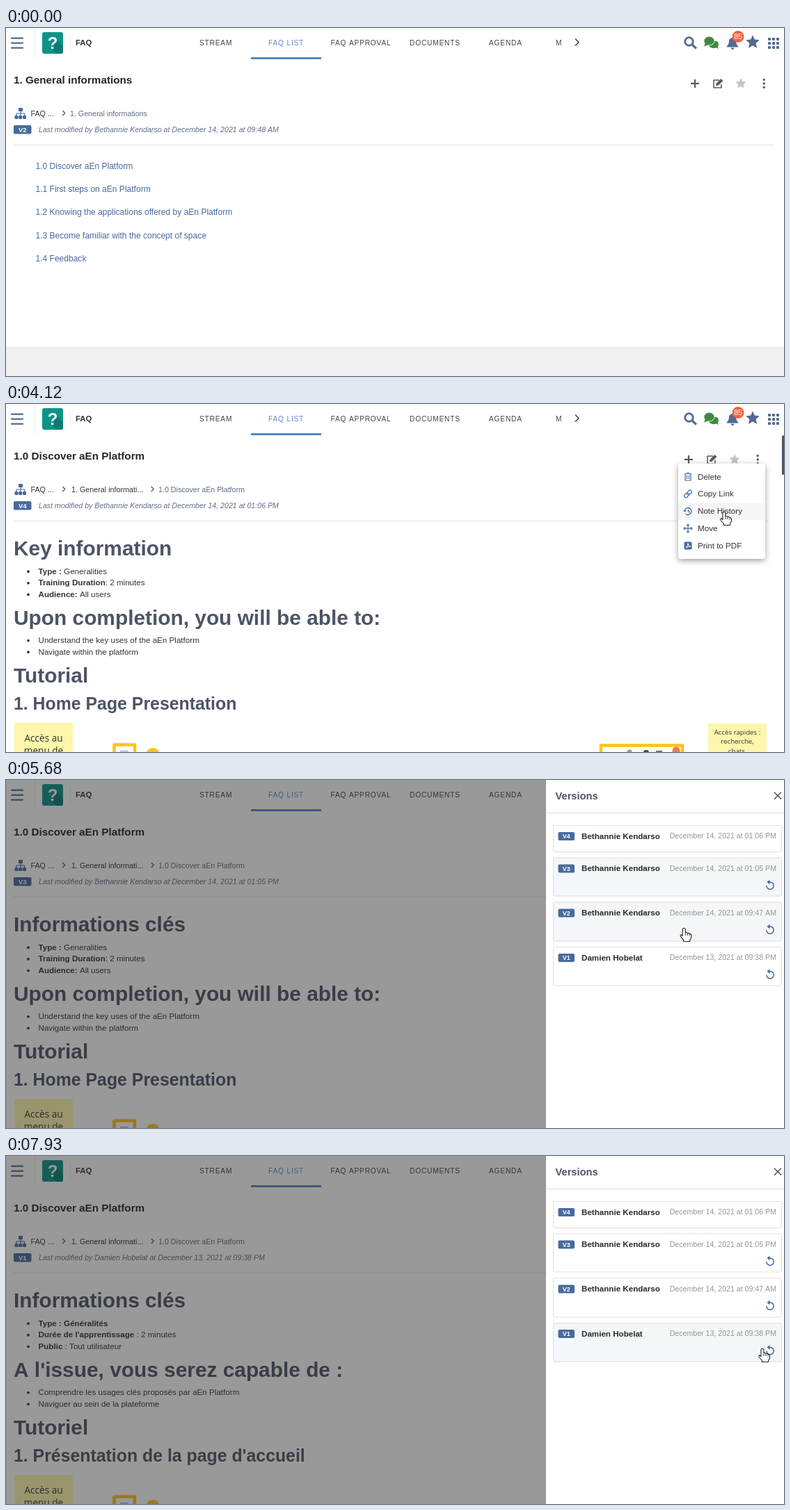
Write an HTML page with a canvas that moves like this. It is 1118 px wide and 501 px high and loops after 7.99 s.

```html
<!DOCTYPE html>
<html lang="en">
<head>
<meta charset="utf-8">
<title>Note versions</title>
<style>
html, body { margin: 0; width: 100%; height: 100%; overflow: hidden; background: #fff; }
canvas { display: block; width: 1118px; height: 501px; }
</style>
</head>
<body>
<canvas id="stage"></canvas>
<script>
const W = 1118, H = 501, LOOP = 7990;
const SANS = '"Liberation Sans", Arial, sans-serif';
const NOTE = '"Open Sans", sans-serif';
const BLUE = '#476a9c', ICON = '#536a94', DARK = '#333', SLATE = '#4d5466', GREY = '#5f6f88', TOOL = '#5a5a5a';
const BRAND = 'aEn Platform', USER = 'Bethannie Kendarso', USER2 = 'Damien Hobelat';

const canvas = document.getElementById('stage');
const dpr = window.devicePixelRatio || 1;
canvas.width = W * dpr;
canvas.height = H * dpr;
const c = canvas.getContext('2d');

const clamp = v => Math.max(0, Math.min(1, v));
const between = (t, a, b) => t >= a && t < b;

// Bursts of change: start, end, number of steps
const bursts = [
  [460, 1190, 12], [1320, 1320, 1], [1520, 1790, 4], [2050, 2540, 8], [2740, 3500, 12],
  [3560, 4320, 12], [4390, 5130, 12], [5200, 5960, 12], [6030, 6780, 11], [6850, 7060, 4], [7260, 7930, 11]
];

function holdTime(t) {
  const b = bursts.filter(b => t >= b[0]).pop();
  if (!b) return 0;
  const [start, end, n] = b;
  if (n === 1) return start;
  const step = (end - start) / (n - 1);
  return start + step * Math.min(n - 1, Math.floor((t - start) / step + 1e-6));
}

// Drawing helpers
function text(s, x, y, size, color, o = {}) {
  c.font = `${o.style || ''} ${o.bold ? 'bold' : ''} ${size}px ${o.font || SANS}`;
  c.letterSpacing = (o.spacing || 0) + 'px';
  c.textAlign = o.align || 'left';
  c.fillStyle = color;
  c.fillText(s, x, y);
  return c.measureText(s).width;
}
const bold = (s, x, y, size, color, o) => text(s, x, y, size, color, { bold: true, ...o });

function rect(x, y, w, h, color, r = 0) {
  c.fillStyle = color;
  c.beginPath();
  c.roundRect(x, y, w, h, r);
  c.fill();
}

function frame(x, y, w, h, color, width = 1, r = 0) {
  c.strokeStyle = color;
  c.lineWidth = width;
  c.beginPath();
  c.roundRect(x, y, w, h, r);
  c.stroke();
}

function dot(x, y, r, color, ry = r) {
  c.fillStyle = color;
  c.beginPath();
  c.ellipse(x, y, r, ry, 0, 0, Math.PI * 2);
  c.fill();
}

function at(x, y, draw) {
  c.save();
  c.translate(x, y);
  draw();
  c.restore();
}

function stroke(d, color, width = 1.5) {
  c.strokeStyle = color;
  c.lineWidth = width;
  c.stroke(new Path2D(d));
}

function fill(d, color) {
  c.fillStyle = color;
  c.fill(new Path2D(d));
}

function star(x, y, r, color) {
  c.fillStyle = color;
  c.beginPath();
  for (let i = 0; i < 10; i++) {
    const a = i * Math.PI / 5 - Math.PI / 2, q = i % 2 ? r * 0.47 : r;
    c.lineTo(x + q * Math.cos(a), y + q * Math.sin(a));
  }
  c.closePath();
  c.fill();
}

const chevron = (x, y, s, color, w) => at(x, y, () => stroke(`M${-s / 2} ${-s}L${s / 2} 0L${-s / 2} ${s}`, color, w));

function badge(label, x, y, w, h) {
  rect(x, y, w, h, BLUE, 2);
  bold(label, x + w / 2, y + h / 2 + 3.3, h > 12 ? 9.6 : 9, '#fff', { align: 'center' });
}

// Page parts
function header() {
  for (const y of [13.5, 20.5, 27.5]) rect(7, y, 18, 2.2, ICON, 1);
  rect(41, 0, 1, 42, '#e8e8e8');
  rect(52, 6, 30, 31, '#0d9488', 3);
  fill('M72 16L82 26V34Q82 37 79 37H73L64 29Z', '#0a7c72');
  bold('?', 67, 30, 24, '#fff', { align: 'center' });
  rect(92, 10, 1, 23, '#e8e8e8');
  bold('FAQ', 100, 25, 11.4, DARK);
  const tabs = [['STREAM', 278], ['FAQ LIST', 377], ['FAQ APPROVAL', 466.5], ['DOCUMENTS', 580], ['AGENDA', 694], ['M', 790]];
  for (const [name, x] of tabs) {
    text(name, x, 25, 10.2, name === 'FAQ LIST' ? '#578dc9' : '#444', { spacing: 0.8 });
  }
  rect(352, 42, 101, 3, '#4f88c6');
  chevron(820.5, 20.5, 5, '#444', 1.7);

  c.strokeStyle = ICON;
  c.lineWidth = 2.8;
  c.beginPath();
  c.arc(981.5, 19.5, 5.8, 0, 7);
  c.stroke();
  stroke('M986 24L992 29.5', ICON, 3.2);

  const green = '#3f8a41';
  dot(1017, 23.5, 7, green, 5.5);
  fill('M1019 27L1024 30L1022 24Z', green);
  dot(1010.5, 18.5, 8, '#fff', 6.8);
  dot(1010.5, 18.5, 7.2, green, 6);
  fill('M1005 21L1003 26.5L1010 24Z', green);

  fill('M1036 26Q1039 23 1039 18.5Q1039.500 14.500 1044 14Q1048.500 14.500 1049 18.500Q1049 23 1052 26V27.500H1036ZM1041.500 28.500H1046.500Q1046 31 1044 31Q1042 31 1041.500 28.500', ICON);
  dot(1052, 12.5, 8.5, '#ee6442');
  text('85', 1052, 16.3, 10.5, '#fff', { align: 'center' });
  star(1073, 20.5, 10.3, ICON);
  for (let i = 0; i < 9; i++) rect(1095 + i % 3 * 6, 14 + Math.floor(i / 3) * 6, 4, 4, ICON, 1);
}

function tools(x) {
  rect(x - 6, 78.8, 12, 2.2, TOOL);
  rect(x - 1.1, 74, 2.2, 12, TOOL);
  at(x + 33, 80, () => {
    stroke('M2 -5H-6V6H5V1', TOOL, 1.6);
    fill('M-3 3L-2.500 0L4.500 -7L7.500 -4L0.500 2.700Z', TOOL);
  });
  star(x + 66, 80, 8, '#c4c4c4');
  for (const y of [74.5, 80, 85.5]) dot(x + 99.3, y, 1.7, TOOL);
}

function pageTop(title, version, info, right) {
  bold(title, 11, 80, 15.25, '#262626');
  tools(right - 115);
  rect(18, 115, 6, 5, BLUE, 1);
  for (const x of [12.5, 18.2, 24]) rect(x, 126, 5, 5, BLUE, 1);
  stroke('M21 120V126M15 126V123H26.500V126', BLUE, 1.2);
  text('FAQ ...', 35.5, 126.5, 10.7, DARK);
  chevron(83, 122.5, 3.5, '#555', 1.3);
  badge('V' + version, 11, 140, 25.5, 12.5);
  text('Last modified by ' + info, 47, 150.3, 10.63, GREY, { style: 'italic' });
  rect(11, 168, right - 11, 1, '#e1e1e1');
}

function indexPage() {
  pageTop('1. General informations', 2, USER + ' at December 14, 2021 at 09:48 AM', 1105);
  text('1. General informations', 92, 126.5, 10.68, GREY);
  const links = ['1.0 Discover ' + BRAND, '1.1 First steps on ' + BRAND, '1.2 Knowing the applications offered by ' + BRAND,
    '1.3 Become familiar with the concept of space', '1.4 Feedback'];
  links.forEach((s, i) => text(s, 42.5, 203 + i * 33.2, 12.04, BLUE));
  rect(0, 459, W, 42, '#f0f0f0');
}

const english = {
  goals: 'Upon completion, you will be able to:',
  facts: ['Type :| Generalities', 'Training Duration|: 2 minutes', 'Audience:| All users'],
  items: ['|Understand the key uses of the ' + BRAND, '|Navigate within the platform'],
  part: 'Tutorial', chapter: '1. Home Page Presentation'
};
const french = {
  goals: "A l'issue, vous serez capable de :",
  facts: ['Type : Généralités|', "Durée de l'apprentissage| : 2 minutes", 'Public| : Tout utilisateur'],
  items: ['|Comprendre les usages clés proposés par ' + BRAND, '|Naviguer au sein de la plateforme'],
  part: 'Tutoriel', chapter: "1. Présentation de la page d'accueil"
};
const versions = [
  { id: 4, name: USER, date: 'December 14, 2021 at 01:06 PM', y: 65, h: 39 },
  { id: 3, name: USER, date: 'December 14, 2021 at 01:05 PM', y: 111.5, h: 56 },
  { id: 2, name: USER, date: 'December 14, 2021 at 09:47 AM', y: 175.5, h: 57 },
  { id: 1, name: USER2, date: 'December 13, 2021 at 09:38 PM', y: 240, h: 56.5 }
];

function bullets(rows, y) {
  rows.forEach((row, i) => {
    const [strong, rest] = row.split('|'), base = y + i * 16.6;
    dot(32, base - 3.6, 1.9, DARK);
    const w = bold(strong, 46.5, base, 11.63, DARK);
    text(rest, 46.5 + w, base, 11.63, DARK);
  });
}

function notePage(id) {
  const v = versions[4 - id], body = id > 2 ? english : french;
  pageTop('1.0 Discover ' + BRAND, id, `${v.name} at ${v.date}`, 1096);
  text('1. General informati...', 94, 126.5, 10.75, DARK);
  chevron(210.5, 122.5, 3.5, '#555', 1.3);
  text('1.0 Discover ' + BRAND, 219, 126.5, 10.68, GREY);
  rect(1115, 45, 3, 57, '#4d5466', 1.5);

  bold(id > 3 ? 'Key information' : 'Informations clés', 11, 218, 29.85, SLATE);
  bullets(body.facts, 244.8);
  bold(body.goals, 11, 317.7, 29.85, SLATE);
  bullets(body.items, 344.2);
  bold(body.part, 11, 400.5, 29.85, SLATE);
  bold(body.chapter, 11, 440.3, 24.85, SLATE);
  illustration();
}

function illustration() {
  const note = (lines, x, y, size, step) => lines.forEach((s, i) =>
    text(s, x, y + i * step, size, DARK, { font: NOTE, align: 'center' }));
  rect(12, 459, 84, 42, '#fdf6ac');
  note(['Accès au', 'menu de'], 54, 485.5, 13.6, 18.5);
  rect(1009, 460, 84, 41, '#fdf6ac');
  note(['Accès rapides :', 'recherche,', 'chats,'], 1051, 476, 9.7, 13.3);
  const gold = '#fcc419';
  frame(155.5, 490.5, 29.5, 30, gold, 4.5);
  rect(164, 499, 12, 1.5, '#aaa');
  dot(211, 505, 10, gold);
  frame(855, 491.5, 117, 30, gold, 4.5);
  dot(896, 501, 3.5, '#999');
  dot(920, 502, 4, '#444');
  rect(934, 499, 9, 2, '#777');
  dot(963, 499, 5.5, '#ef7a45');
}

const menuItems = ['Delete', 'Copy Link', 'Note History', 'Move', 'Print to PDF'];
const menuIcons = [
  () => stroke('M-5 -4H5M-2 -5.500H2M-4 -4V5.500H4V-4M-1.500 -2V3.500M1.500 -2V3.500', BLUE, 1.2),
  () => {
    c.rotate(-Math.PI / 4);
    frame(-6.5, -2.3, 7.5, 4.6, BLUE, 1.2, 2.3);
    frame(-1, -2.3, 7.5, 4.6, BLUE, 1.2, 2.3);
  },
  () => {
    stroke('M-4.500 -2A5 5 0 1 1 -3.500 3.800M0.500 -2.500V0.500L3 2', BLUE, 1.3);
    fill('M-7 -1.500H-2L-4.500 1.500Z', BLUE);
  },
  () => stroke('M-6 0H6M0 -6V6M-4 -2L-6 0L-4 2M4 -2L6 0L4 2M-2 -4L0 -6L2 -4M-2 4L0 6L2 4', BLUE, 1.2),
  () => {
    rect(-5.5, -5.5, 11, 11, BLUE, 1.5);
    stroke('M-3 3Q0 0 0 -3.500Q1 1 3.500 1Q0 0.500 -3 3', '#fff', 1);
  }
];

function menu(open, pointerY) {
  c.save();
  c.globalAlpha = open;
  c.translate(1091, 85);
  c.scale(0.5 + open / 2, 0.5 + open / 2);
  c.translate(-1091, -85);
  c.save();
  c.shadowColor = 'rgba(0,0,0,.38)';
  c.shadowBlur = 8 * dpr;
  c.shadowOffsetY = 2.5 * dpr;
  rect(966, 85.5, 125, 137.5, '#fff', 4);
  c.restore();
  menuItems.forEach((s, i) => {
    const y = 104.5 + i * 24.9;
    if (Math.abs(pointerY + 1 - y) < 12.4) rect(966, y - 12.4, 125, 24.8, '#f6f6f7');
    at(980, y, menuIcons[i]);
    text(s, 994, y + 4, 11.63, DARK);
  });
  c.restore();
}

function drawer(x, current, pressed, hover) {
  rect(x, 0, 350, H, '#fff');
  bold('Versions', x + 13.5, 28, 14.7, SLATE);
  at(x + 333, 22.5, () => stroke('M-5 -5L5 5M5 -5L-5 5', '#555', 1.5));
  rect(x, 47, 350, 1, '#dcdcdc');
  for (const v of versions) {
    const tint = v.id === pressed ? '#ebecf0' : v.id === current || v.id === hover ? '#f4f6fa' : '#fff';
    rect(x + 10, v.y, 328.5, v.h, tint, 2);
    frame(x + 10.5, v.y + 0.5, 328, v.h - 1, '#dfdfe2', 1, 2);
    badge('V' + v.id, x + 17.5, v.y + 10, 23.5, 12);
    bold(v.name, x + 51, v.y + 19.6, 11.62, '#2a2a2a');
    text(v.date, x + 331, v.y + 19, 10.62, '#949494', { align: 'right' });
    if (v.id < 4) at(x + 322, v.y + 40, () => {
      stroke('M-1 -4.500A5.200 5.200 0 1 1 -5.200 0.600', BLUE, 1.5);
      fill('M-4.500 -4.500L-0.500 -8V-1Z', BLUE);
    });
  }
}

function statusBar(t) {
  if (!between(t, 1520, 2540)) return;
  const y = H - 22 * clamp((t - 1520) / 270) ** 2.8;
  c.globalAlpha = 1 - clamp((t - 2050) / 490);
  rect(-4, y, 372, 30, '#cfcfcf', 4);
  text('Loading the offline help page', 45, y + 13, 11, '#444');
  c.globalAlpha = 1;
}

// Pointer
const track = [
  [460, 1080, 421], [800, 620, 190], [1000, 330, 135], [1190, 151, 192],
  [2600, 151, 192], [2740, 1099, 130], [3080, 1080, 64], [3300, 1079, 76], [3560, 1079, 76],
  [3800, 1040, 188], [4110, 1032, 155], [4390, 1027, 154], [5200, 1026, 154], [5400, 1010, 150],
  [5700, 960, 238], [5960, 900, 214], [6250, 884, 189], [6480, 884, 189], [6780, 890, 200],
  [7060, 960, 262], [7260, 960, 262], [7500, 1040, 268], [7930, 1087, 277]
];

function pointerAt(t) {
  const i = track.findIndex(k => k[0] > t);
  if (i < 0) return track[track.length - 1].slice(1);
  if (i === 0) return track[0].slice(1);
  const [t0, x0, y0] = track[i - 1], [t1, x1, y1] = track[i];
  const u = (t - t0) / (t1 - t0);
  return [x0 + (x1 - x0) * u, y0 + (y1 - y0) * u];
}

const HAND = 'M-2 1.500Q0 -1 2 1.500V6.500Q3.500 5.800 5 7.500Q6.800 6.800 8 8.500Q10.500 8.300 10.500 11V14L8.500 17.500V19.500H-0.500V17.500L-4.800 12.500Q-5.800 10 -4 9.800L-2 11.500Z';
const ARROW = 'M0 0V15L3.500 12L6 18L8.500 17L6 11H11Z';

function pointer(t, x, y) {
  if (t < 460 || between(t, 2539, 2740)) return;
  const arrow = t < 1320 || between(t, 2740, 3200);
  c.globalAlpha = between(t, 2050, 2540) ? 1 - (t - 2050) / 490 : 1;
  at(x, y, () => {
    const shape = arrow ? ARROW : HAND;
    fill(shape, '#fff');
    stroke(shape, '#222', 1.1);
    if (!arrow) stroke('M2 7V11M5 8V11M8 9V11.500', '#222', 0.9);
  });
  c.globalAlpha = 1;
}

function draw(t) {
  c.setTransform(dpr, 0, 0, dpr, 0, 0);
  c.lineJoin = 'round';
  rect(0, 0, W, H, '#fff');
  header();

  const [px, py] = pointerAt(t);
  const current = t < 5400 ? 4 : t < 6470 ? 3 : t < 7500 ? 2 : 1;
  if (t < 1785) indexPage();
  else notePage(current);
  statusBar(t);

  if (between(t, 3300, 4389)) menu(clamp((t - 3270) / 170), t < 3560 ? 0 : py);

  const u = clamp((t - 4450) / 280);
  if (u > 0) {
    rect(0, 0, W, H, `rgba(33,33,33,${0.46 * (1 - (1 - u) ** 1.3)})`);
    const pressed = between(t, 6240, 6460) ? 2 : between(t, 7400, 7500) ? 1 : 0;
    const over = t > 4800 && versions.find(v => py >= v.y && py <= v.y + v.h);
    drawer(1118 - 342 * (1 - (1 - u) ** 3), current, pressed, over ? over.id : 0);
  }
  pointer(t, px, py);
}

const begin = performance.now();
function tick() {
  draw(holdTime((performance.now() - begin) % LOOP));
  requestAnimationFrame(tick);
}
tick();
</script>
</body>
</html>
```
